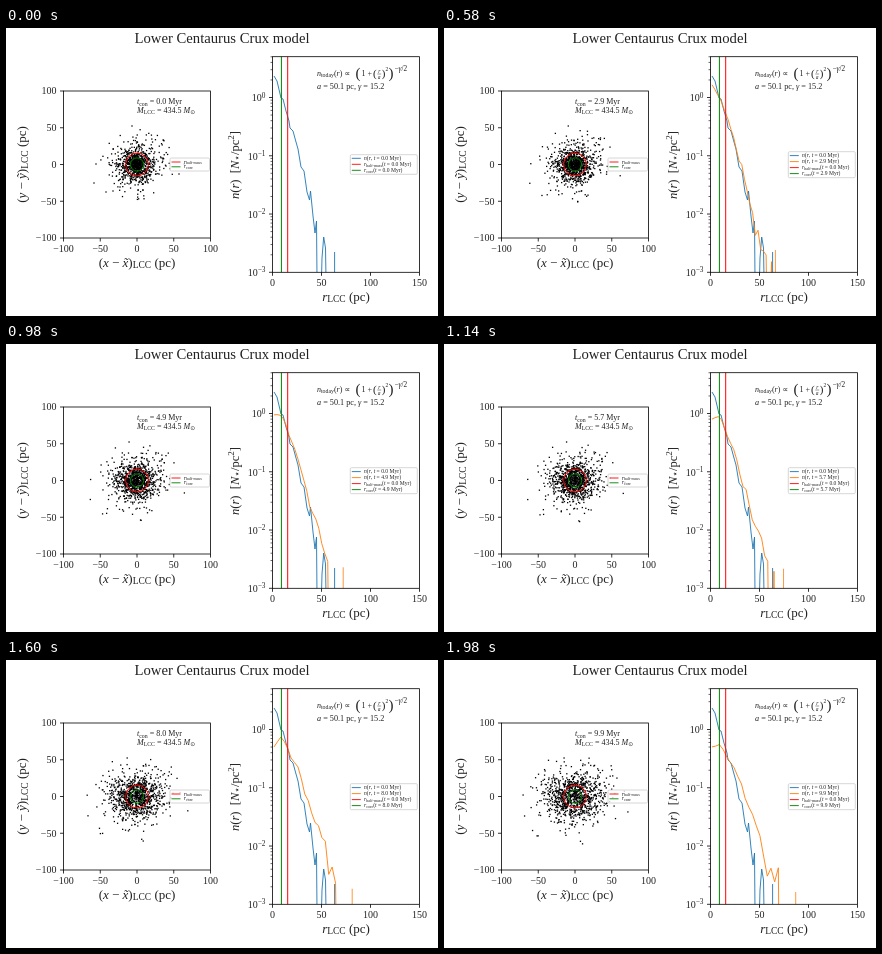
Write an HTML page with a canvas that moves like this. It is 432 px wide and 288 px high and loops after 2000 ms.

```html
<!DOCTYPE html>
<html>
<head>
<meta charset="utf-8">
<style>
html, body { margin: 0; width: 100%; height: 100%; overflow: hidden; background: #fff; }
canvas { display: block; }
</style>
</head>
<body>
<canvas id="stage" width="432" height="288"></canvas>
<script>
const ctx = document.getElementById('stage').getContext('2d');
const SERIF = '"Liberation Serif", "Noto Serif", serif';
const BLUE = '#1f77b4', ORANGE = '#ff7f0e', RED = '#f00', GREEN = '#008000';
const CX = 131, CY = 136.5, PC = 0.735;

// Repeatable value in 0..1 from two integers
function hash(a, b) {
  let h = Math.imul(a + 1, 374761393) ^ Math.imul(b + 7, 668265263);
  h = Math.imul(h ^ (h >>> 13), 1274126177);
  h = Math.imul(h ^ (h >>> 15), 2246822519);
  return ((h ^ (h >>> 16)) >>> 0) / 4294967296;
}
const gauss = (i, k) =>
  Math.sqrt(-2 * Math.log(hash(i, k) + 1e-9)) * Math.cos(2 * Math.PI * hash(i, k + 1));

// Stars drift in straight lines; the cluster starts exponential
const stars = Array.from({ length: 1000 }, (_, i) => {
  const r = Math.min(50, -8 * Math.log(hash(i, 1) * hash(i, 2) + 1e-9));
  const a = 2 * Math.PI * hash(i, 3);
  return {
    x: CX + PC * r * Math.cos(a), y: CY + PC * r * 0.95 * Math.sin(a),
    vx: PC * 1.55 * gauss(i, 4), vy: PC * 1.05 * gauss(i, 6)
  };
});
[[88, 155, -.75, .1], [100, 164, -.7, 1.2], [107, 163, -1.3, 1.3],
 [126, 98, -.6, 0], [90, 136, -1.1, -.1], [173, 146, 1.1, .6], [178, 136, .5, .4]]
  .forEach(([x, y, vx, vy]) => stars.push({ x, y, vx, vy }));

// Heights of the evolving profile at 8 px steps, one row per time
const times = [0, 1.3, 2.9, 4.1, 5.7, 8, 9.9];
const profile = [
  [48, 70, 94, 121, 158, 195, 222, 250, 265],
  [51, 69, 93, 120, 152, 198, 220, 245, 260],
  [57, 70, 91, 119, 147, 188, 218, 240, 255],
  [66, 70, 93, 116, 144, 179, 206, 235, 250],
  [75, 72, 93, 113, 143, 169, 198, 222, 245],
  [87, 76, 95, 109, 135, 162, 178, 208, 235],
  [87, 85, 98, 111, 135, 158, 183, 206, 220]
];
const mix = (a, b, f) => a + (b - a) * f;
function level(x, t) {
  let k = 0;
  while (k < times.length - 2 && t > times[k + 1]) k++;
  const f = (t - times[k]) / (times[k + 1] - times[k]);
  const p = (x - 268) / 8, j = Math.min(7, Math.floor(p));
  const at = row => mix(row[j], row[j + 1], p - j);
  return mix(at(profile[k]), at(profile[k + 1]), f);
}

const initial = new Path2D('M268 48L271 53L275 70L277 71L280 83L283 93L284 100L287 103' +
  'L290 114L292 121L295 139L298 143L301 164L303.5 172L304.5 163L307 188L309 205' +
  'L310.5 193L311 250M315.5 250L316 230L317.7 209L319.5 220L320 250M328.6 250V224');

function line(color, width, ...pts) {
  ctx.strokeStyle = color;
  ctx.lineWidth = width;
  ctx.beginPath();
  for (let i = 0; i < pts.length; i += 2) ctx.lineTo(pts[i], pts[i + 1]);
  ctx.stroke();
}

// Markup: *italic*, _{subscript}, ^{superscript}
function rich(text, x, y, size, align = 0) {
  let width = 0;
  const runs = text.split(/([_^]\{[^}]*\}|\*[^*]+\*)/).filter(Boolean).map(s => {
    const shift = s[0] === '_' ? 0.15 : s[0] === '^' ? -0.38 : 0;
    const body = shift ? s.slice(2, -1) : s[0] === '*' ? s.slice(1, -1) : s;
    const font = (s[0] === '*' ? 'italic ' : '') + size * (shift ? 0.73 : 1) + 'px ' + SERIF;
    ctx.font = font;
    const run = { body, font, dx: width, dy: shift * size };
    width += ctx.measureText(body).width;
    return run;
  });
  ctx.fillStyle = '#222';
  for (const r of runs) {
    ctx.font = r.font;
    ctx.fillText(r.body, x + r.dx - width * align, y + r.dy);
  }
}
function upright(text, x, y, size) {
  ctx.save();
  ctx.translate(x, y);
  ctx.rotate(-Math.PI / 2);
  rich(text, 0, 0, size, 0.5);
  ctx.restore();
}

function legend(x, y, w, h, rows, first, step) {
  ctx.beginPath();
  ctx.roundRect(x, y, w, h, 1.2);
  ctx.fillStyle = 'rgba(255,255,255,.8)';
  ctx.fill();
  ctx.strokeStyle = '#ccc';
  ctx.lineWidth = 0.8;
  ctx.stroke();
  rows.forEach(([color, text], i) => {
    const ry = first + i * step;
    line(color, 0.9, x + 1.5, ry, x + 10.5, ry);
    rich(text, x + 13.7, ry + 1.5, 5.6);
  });
}

function ring(r, color) {
  ctx.strokeStyle = color;
  ctx.lineWidth = 1;
  ctx.beginPath();
  ctx.arc(CX, CY, r, 0, 7);
  ctx.stroke();
}

function drawMap(t) {
  ctx.fillStyle = '#000';
  for (const s of stars) ctx.fillRect(s.x + s.vx * t - 0.65, s.y + s.vy * t - 0.65, 1.3, 1.3);
  ring(11.4, RED);
  ring(6.6, GREEN);

  for (let v = -100; v <= 100; v += 50) {
    const x = CX + v * PC, y = CY - v * PC;
    const label = String(v).replace('-', '−');
    line('#000', 0.8, x, 210, x, 213.5);
    line('#000', 0.8, 57.5, y, 54, y);
    rich(label, x, 223.5, 10, 0.5);
    rich(label, 50.5, y + 3.4, 10, 1);
  }
  ctx.strokeRect(57.5, 63, 147, 147);
  rich('(*x* − *x̃*)_{LCC} (pc)', CX, 238.5, 13, 0.5);
  upright('(*y* − *ỹ*)_{LCC} (pc)', 20, CY, 13);
  rich('*t*_{con} = ' + t.toFixed(1) + ' Myr', 131, 76.3, 8);
  rich('*M*_{LCC} = 434.5 *M*_{⊙}', 131, 84.8, 8);
  legend(164, 130, 39.5, 13, [[RED, '*r*_{half-mass}'], [GREEN, '*r*_{core}']], 134, 4.8);
}

function drawEvolved(t, frame) {
  const step = 2.3 + 0.14 * t, pts = [];
  for (let i = 0, x = 268; x < 340; x += step, i++) {
    const spread = 0.5 + 12 * ((x - 268) / 55) ** 2;
    const y = level(x, t) + (hash(i, Math.floor(frame / 3) + 20) - 0.5) * 2 * spread;
    if (y > 235) pts.push(pts[pts.length - 2] + 0.4, 255, x + step - 0.5, 255);
    else pts.push(x, y);
  }
  line(ORANGE, 0.9, ...pts);
  const far = 323 + 2.9 * t;
  line(ORANGE, 0.8, far, 250, far, 222 + Math.max(0, far - 335) * 0.6);
}

function drawProfile(t, frame) {
  ctx.save();
  ctx.beginPath();
  ctx.rect(266.5, 28.7, 147, 215.6);
  ctx.clip();
  ctx.lineJoin = 'round';
  ctx.strokeStyle = BLUE;
  ctx.lineWidth = 0.9;
  ctx.stroke(initial);
  if (frame) drawEvolved(t, frame);
  line(GREEN, 1, 275.4, 20, 275.4, 250);
  line(RED, 1, 281.7, 20, 281.7, 250);
  ctx.restore();

  for (let v = 0; v <= 150; v += 50) {
    const x = 266.5 + v * 0.98;
    line('#000', 0.8, x, 244.3, x, 247.8);
    rich(String(v), x, 257.5, 10, 0.5);
  }
  for (let e = -3; e <= 0; e++) {
    const y = 69.5 - e * 58.27;
    line('#000', 0.8, 266.5, y, 263, y);
    rich('10^{' + String(e).replace('-', '−') + '}', 259.5, y + 3.8, 10, 1);
    for (let m = 2; m < (e ? 10 : 6); m++) {
      const my = y - 58.27 * Math.log10(m);
      line('#000', 0.6, 266.5, my, 264.5, my);
    }
  }
  ctx.lineWidth = 0.8;
  ctx.strokeRect(266.5, 28.7, 147, 215.6);
  rich('*r*_{LCC} (pc)', 340, 272.5, 13, 0.5);
  upright('*n*(*r*)  [*N*_{⋆}/pc^{2}]', 232.5, 137, 12.5);

  rich('*n*_{today}(*r*) ∝', 311, 48, 8);
  rich('(', 349.5, 50, 15);
  rich('1 +', 355.5, 48, 8);
  rich('(', 367, 49, 11);
  rich('*r*', 373.2, 44.7, 5.5, 0.5);
  rich('*a*', 373.2, 50.5, 5.5, 0.5);
  line('#000', 0.4, 371.3, 46, 375.2, 46);
  rich(')', 375.7, 49, 11);
  rich('2', 379.5, 43, 5.5);
  rich(')', 382.5, 50, 15);
  rich('−*γ*/2', 388.5, 43, 7.3);
  rich('*a* = 50.1 pc, *γ* = 15.2', 311, 61, 8.2);

  const at = time => '*t* = ' + time.toFixed(1) + ' Myr)';
  const rows = [
    [BLUE, '*n*(*r*, ' + at(0)],
    [ORANGE, '*n*(*r*, ' + at(t)],
    [RED, '*r*_{half-mass}(' + at(0)],
    [GREEN, '*r*_{core}(' + at(t)]
  ];
  if (frame) legend(344.3, 123.7, 67, 26, rows, 127.6, 6);
  else legend(344.3, 126.7, 67, 19.6, rows.filter(r => r[0] !== ORANGE), 130.3, 6);
}

function draw(now) {
  const frame = Math.floor((now % 2000) / 20);
  const t = frame / 10;
  ctx.fillStyle = '#fff';
  ctx.fillRect(0, 0, 432, 288);
  rich('Lower Centaurus Crux model', 216, 15, 14.7, 0.5);
  drawMap(t);
  drawProfile(t, frame);
  requestAnimationFrame(draw);
}
draw(0);
</script>
</body>
</html>
```
